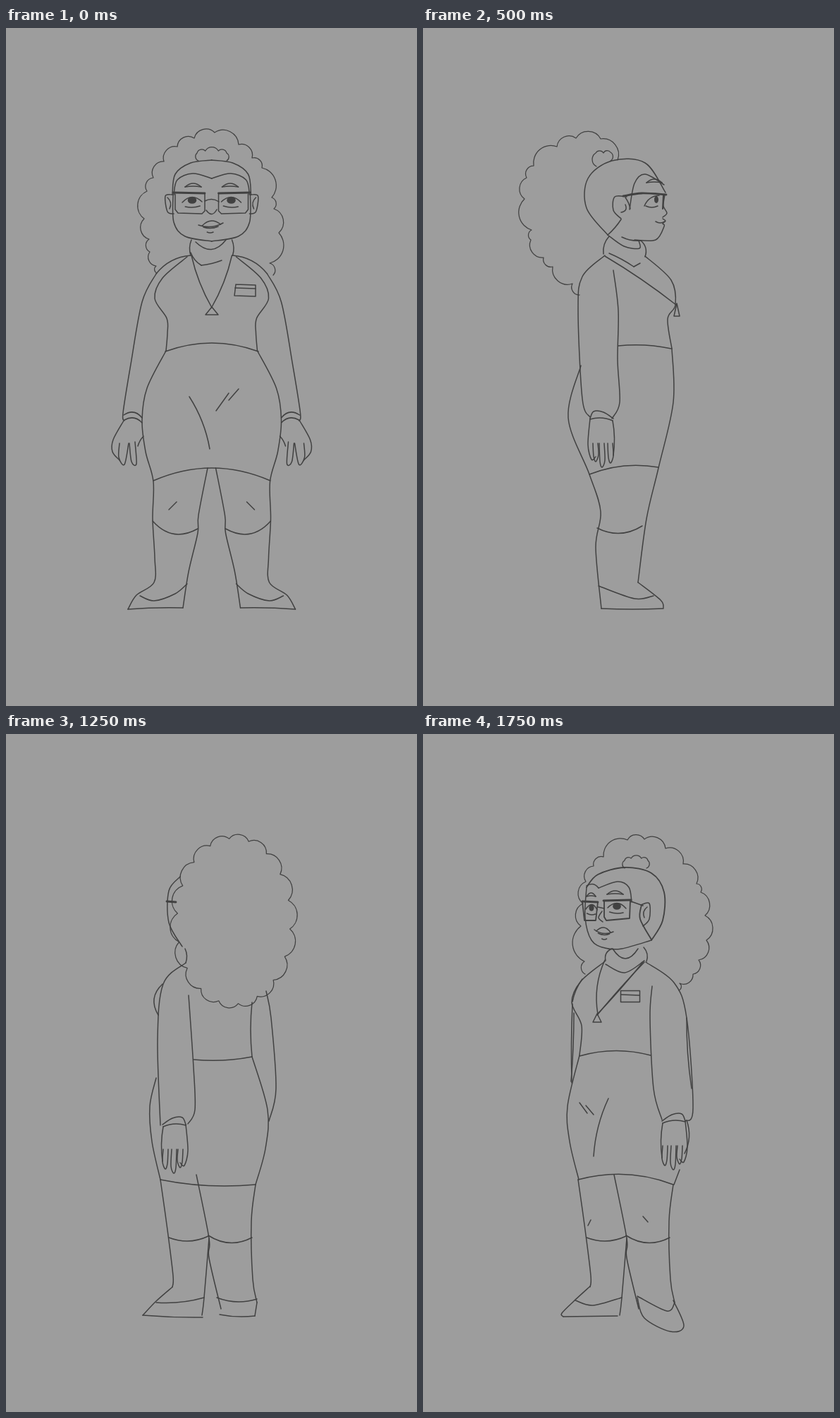
An HTML page with a canvas that plays this animation: 583 px wide and 960 px high, repeating every 2000 ms.

```html
<!DOCTYPE html>
<html lang="en">
<head>
<meta charset="utf-8">
<title>Character turnaround</title>
<style>
  html, body { margin: 0; height: 100%; overflow: hidden; background: #9d9d9d; }
  canvas { display: block; }
</style>
</head>
<body>
<canvas id="stage" width="583" height="960"></canvas>
<script>
const ctx = document.getElementById("stage").getContext("2d");

const pairs = n => n.flatMap((x, i) => i % 2 ? [] : [[x, n[i + 1]]]);
const pen = (width = 1.5) => { ctx.lineWidth = width; };
const trace = d => ctx.stroke(new Path2D(d));

// Smooth stroke through all points.
function line(...n) {
  const p = pairs(n);
  let d = `M${p[0]}`;
  for (let i = 1; i < p.length; i++) {
    const a = p[i - 1], b = p[i], before = p[i - 2] || a, after = p[i + 1] || b;
    const c1 = a.map((v, j) => v + (b[j] - before[j]) / 6);
    const c2 = b.map((v, j) => v - (after[j] - a[j]) / 6);
    d += `C${c1} ${c2} ${b}`;
  }
  trace(d);
}

const poly = (...n) => trace("M" + pairs(n).join("L"));

// Single curve; a positive sag bends down when drawn left to right.
function bow(x1, y1, x2, y2, sag = 0) {
  const k = 2 * sag / Math.hypot(x2 - x1, y2 - y1);
  const cx = (x1 + x2) / 2 - (y2 - y1) * k, cy = (y1 + y2) / 2 + (x2 - x1) * k;
  trace(`M${x1} ${y1}Q${cx} ${cy} ${x2} ${y2}`);
}

// Scalloped outline, one round curl per pair of points.
function curls(...n) {
  const p = pairs(n);
  pen(1.25);
  trace(p.slice(1).reduce((d, end, i) => {
    const r = 0.58 * Math.hypot(end[0] - p[i][0], end[1] - p[i][1]);
    return `${d}A${r} ${r} 0 0 1 ${end}`;
  }, `M${p[0]}`));
  pen();
}

function flipped(axis, dy, draw) {
  ctx.save();
  ctx.transform(-1, 0, 0, 1, axis, dy);
  draw();
  ctx.restore();
}

function both(draw) {
  draw();
  flipped(583.5, 0, draw);
}

function dot(x, y, rx, ry) {
  ctx.beginPath();
  ctx.ellipse(x, y, rx, ry, 0, 0, 7);
  ctx.fill();
}

function bun(x, y, w) {
  curls(x + 2, y, x, y - 11, x + w * .28, y - 14, x + w * .72, y - 14, x + w, y - 11, x + w, y);
}

function eye(x, y, w) {
  bow(x - w, y + 3, x + w, y + 2, -7);
  dot(x, y, w * .45, 4.8);
  bow(x - w * .7, y + 9, x + w * .8, y + 8, 1.5);
}

function brow(x, y, w) {
  bow(x, y, x + w, y, -5);
  bow(x, y, x + w, y, -1);
}

function mouth(x, y, w) {
  bow(x, y, x + w, y - 3, 4);
  bow(x + w * .15, y + 1, x + w * .9, y - 1, -6);
  bow(x + w * .2, y + 3, x + w * .8, y + 2, 2);
  bow(x + w * .35, y + 10, x + w * .6, y + 10, 1);
}

function tassel(x, y, w, h) {
  poly(x, y, x - w, y + h, x + w, y + h, x, y);
}

function hand(x, y) {
  ctx.save();
  ctx.translate(x, y);
  line(0, 8, 5, -2, 19, -1, 33, 8);
  bow(0, 9, 32, 11, -3);
  line(0, 8, -3, 45, 2, 66, 8, 62);
  for (const [left, tip] of [[4, 69], [13, 77], [25, 71]])
    line(left, 43, left + 1, tip - 8, left + 4, tip, left + 8, tip - 10, left + 7, 43);
  bow(33, 60, 32, 11, 2);
  ctx.restore();
}

function curlyHead(...rest) {
  curls(214, 347, 213, 337, 204, 317, 203, 299, 196, 270, 200, 231, 209, 212,
    224, 189, 243, 168, 267, 156, 296, 148, 330, 165, 349, 184, 363, 198,
    377, 240, 380, 256, 387, 290, 374, 333, 379, 350, ...rest);
}

// Arms, hips and legs shared by the front and back views.
function upright(hem) {
  both(() => {
    line(213, 348, 193, 388, 177, 476, 166, 545, 168, 556);
    bow(167, 548, 193, 552, -6);
    bow(168, 555, 193, 559, -5);
    line(167, 556, 152, 583, 151, 600, 161, 612);
    line(161, 588, 160, 608, 168, 618, 174, 588);
    line(175, 588, 178, 614, 185, 617, 183, 586);
    bow(187, 592, 195, 578, -1);
    line(227, 457, 200, 510, 193, 555, 198, 600, 209, 642,
      208, 695, 211, 750, 210, 785, 185, 803, 173, 823);
    line(286, hem, 273, 690, 272, 715, 259, 770, 251, 821);
    bow(173, 823, 251, 821, -1);
    bow(208, 698, 272, 709, 13);
  });
}

function front() {
  curlyHead();
  bun(271, 188, 42);
  both(() => {
    line(236, 236, 240, 207, 262, 191, 292, 187);
    line(238, 236, 243, 215, 265, 206, 292, 213);
    line(237, 236, 238, 275, 254, 295, 292, 302);
    line(236, 236, 226, 238, 229, 260, 238, 263);
    bow(229, 240, 232, 256, -3);
    poly(240, 235, 240, 257, 244, 262, 278, 263, 282, 259, 282, 235);
    pen(2.8);
    bow(237, 233, 282, 234);
    pen();
    eye(264, 244, 14);
    brow(254, 225, 23);
    bow(263, 300, 262, 322, 2);
    bow(263, 322, 292, 396, 3);
    bow(262, 322, 213, 348, 6);
    line(257, 324, 222, 354, 211, 383, 228, 411, 229, 432, 227, 457);
    bow(231, 682, 242, 671);
    line(190, 804, 210, 811, 240, 801, 257, 787);
  });
  bow(282, 245, 302, 246, -3);
  bow(284, 258, 299, 257, 6);
  mouth(273, 279, 35);
  bow(269, 303, 312, 300, 12);
  bow(262, 318, 277, 336, 2);
  bow(277, 336, 306, 329, 1);
  tassel(292, 395, 9, 11);
  poly(326, 363, 354, 364, 354, 380, 324, 379, 326, 363);
  bow(325, 368, 354, 369);
  bow(226, 458, 358, 458, -12);
  bow(209, 641, 375, 641, -18);
  bow(260, 522, 289, 596, -4);
  bow(298, 542, 316, 517);
  bow(316, 527, 330, 511);
  upright(623);
}

function back() {
  curlyHead(363, 365, 328, 381, 250, 375, 235, 365, 213, 349);
  both(() => {
    line(224, 364, 229, 420, 227, 457);
    line(190, 803, 222, 802, 256, 794);
    bow(160, 582, 184, 586, -2);
    bow(178, 571, 192, 591, 2);
    bow(190, 582, 198, 599);
  });
  bow(226, 457, 357, 457, 6);
  bow(204, 626, 379, 628, 5);
  upright(632);
}

function quarterLegs() {
  line(221, 636, 227, 688, 225, 770, 219, 803);
  line(305, 622, 287, 712, 287, 740, 270, 812);
  line(356, 629, 346, 700, 338, 765, 339, 781);
  line(287, 712, 294, 796, 297, 821);
  bow(226, 711, 288, 708, 9);
  bow(288, 709, 344, 711, 6);
}

function quarter() {
  curls(213, 361, 212, 351, 193, 338, 185, 318, 174, 290, 176, 255, 182, 222,
    188, 210, 207, 182, 232, 160, 262, 147, 286, 148, 320, 172, 334, 185,
    345, 207, 349, 238, 352, 270, 347, 320, 346, 338);
  bun(257, 188, 33);
  pen(1.8);
  line(252, 290, 236, 262, 234, 222, 252, 195, 290, 187, 328, 197, 344, 215);
  line(266, 240, 268, 260, 252, 289);
  poly(282, 234, 283, 259, 316, 262, 319, 257, 319, 234);
  poly(328, 236, 331, 262, 347, 262, 350, 235);
  bow(264, 241, 281, 235);
  pen(2.8);
  bow(281, 233, 320, 234);
  bow(328, 236, 350, 235);
  pen();
  line(280, 236, 284, 215, 300, 207, 327, 216);
  bow(327, 216, 344, 213, -4);
  line(344, 215, 346, 258, 337, 290, 318, 301, 294, 302, 252, 290);
  line(267, 240, 255, 238, 255, 260, 264, 270);
  bow(258, 243, 262, 258, -3);
  bow(319, 245, 328, 243);
  eye(301, 242, 13);
  eye(337, 244, 8);
  brow(292, 225, 23);
  brow(331, 228, 13);
  line(322, 249, 327, 258, 321, 264);
  mouth(306, 278, 27);

  bow(263, 300, 259, 320, 3);
  bow(271, 302, 307, 302, 14);
  bow(308, 302, 317, 319, -4);
  line(262, 319, 290, 336, 317, 324);
  bow(262, 321, 329, 396, -1);
  bow(264, 321, 328, 394, 1);
  bow(318, 318, 328, 395, -6);
  tassel(329, 394, 6, 12);
  line(318, 320, 352, 348, 365, 378, 351, 411, 354, 453);
  bow(350, 345, 364, 377, -2);
  bow(364, 380, 365, 492, -1);
  bow(362, 393, 366, 490, 1);

  line(260, 321, 220, 350, 202, 400, 193, 528, 204, 546);
  bow(202, 400, 195, 500, -2);
  line(251, 355, 254, 400, 249, 500, 237, 544);
  hand(204, 538);
  bow(202, 545, 205, 592, 5);

  bow(253, 453, 354, 454, -7);
  line(354, 453, 371, 525, 368, 575, 355, 629);
  bow(212, 615, 220, 636);
  bow(221, 636, 356, 629, -11);
  bow(313, 514, 334, 596, -4);
  bow(334, 537, 345, 524);
  bow(343, 535, 354, 520);
  quarterLegs();
  bow(257, 689, 264, 681);
  bow(338, 686, 342, 694);
  line(221, 800, 206, 836, 225, 844, 262, 825, 272, 796);
  line(219, 803, 230, 815, 272, 794);
  line(339, 780, 362, 801, 379, 818, 377, 823);
  bow(377, 823, 300, 822);
  line(294, 796, 335, 807, 360, 800);
}

function quarterRight() {
  quarter();
  pen(1.9);
  poly(352, 366, 363, 366, 364, 380, 352, 380, 352, 366);
  bow(352, 372, 363, 373);
}

function quarterLeft() {
  flipped(576, 2, quarter);
  ctx.strokeRect(280.5, 363.5, 27, 16);
  bow(281, 369, 307, 370);
}

function side() {
  curls(222, 378, 212, 362, 184, 338, 171, 325, 153, 300, 154, 286, 144, 242,
    147, 212, 157, 195, 190, 168, 217, 156, 252, 157, 276, 187);
  curls(246, 196, 245, 177, 256, 177, 266, 176, 266, 188);
  line(262, 293, 232, 255, 234, 213, 268, 188, 315, 191, 344, 233);
  line(293, 257, 300, 220, 315, 207, 342, 222);
  bow(262, 293, 281, 271, 1);
  line(289, 239, 272, 239, 270, 258, 281, 270);
  bow(287, 250, 281, 261, -4);
  bow(287, 240, 294, 256, -1);
  pen(2.8);
  line(284, 238, 310, 234, 345, 236);
  pen(2);
  bow(341, 237, 340, 256);
  pen();
  line(343, 236, 341, 252, 346, 262, 340, 268);
  line(340, 270, 344, 273, 340, 277, 342, 281, 330, 300, 300, 300);
  bow(330, 274, 343, 274, 2);
  bow(314, 252, 335, 237, -4);
  dot(331, 243, 3, 5);
  bow(316, 252, 333, 252, 2);
  brow(317, 219, 22);

  bow(264, 295, 256, 320, 3);
  line(262, 293, 285, 309, 307, 312, 306, 301);
  bow(282, 296, 310, 301, 2);
  bow(309, 301, 315, 324, -4);
  bow(264, 319, 299, 338, -1);
  bow(299, 338, 308, 333);
  line(315, 323, 352, 357, 358, 392, 347, 412, 353, 454);
  bow(258, 323, 359, 392, -2);
  tassel(360, 390, 4, 18);

  line(258, 322, 226, 352, 220, 400, 226, 525, 237, 551);
  line(270, 343, 277, 400, 276, 470, 279, 530, 268, 553);
  hand(237, 545);
  line(224, 478, 206, 552, 236, 632, 252, 685, 245, 735, 253, 822);
  line(353, 454, 355, 530, 334, 623, 317, 695, 305, 785);
  line(305, 785, 337, 810, 341, 821);
  bow(253, 822, 341, 822, 1);
  bow(277, 450, 352, 454, -3);
  bow(236, 632, 334, 622, -7);
  bow(247, 708, 311, 705, 9);
  line(249, 790, 300, 808, 327, 804);
}

function rear() {
  const outline = [];
  for (let i = 0; i <= 18; i++) {
    const a = i * Math.PI / 9 + 2;
    outline.push(252 + 80 * Math.cos(a), 263 + 117 * Math.sin(a));
  }
  curls(...outline);
  line(328, 200, 344, 220, 344, 265, 325, 299);
  pen(2.8);
  bow(334, 236, 347, 235);
  pen();
  bow(321, 302, 320, 322, 2);
  line(320, 322, 352, 352, 360, 430, 356, 552);
  line(316, 368, 309, 470, 307, 530, 317, 550);
  hand(320, 543);
  bow(353, 352, 359, 396, -9);
  bow(226, 378, 226, 455, -2);
  line(206, 362, 199, 400, 192, 500, 202, 546);
  bow(226, 455, 309, 459, 3);
  line(226, 455, 204, 530, 207, 585, 221, 636);
  line(362, 485, 371, 525, 368, 575, 356, 629);
  bow(221, 636, 356, 629, 5);
  quarterLegs();
  bow(219, 803, 222, 822);
  bow(222, 822, 272, 820, 2);
  bow(219, 798, 276, 796, 5);
  line(339, 781, 362, 801, 381, 821);
  bow(296, 824, 381, 821, 1);
  bow(294, 796, 362, 803, 3);
}

const poses = [
  front,
  quarterRight,
  side,
  rear,
  back,
  () => flipped(575, 2, rear),
  () => flipped(569, 1, side),
  quarterLeft
];

const began = performance.now();
function tick() {
  const time = (performance.now() - began) % 2000;
  ctx.fillStyle = "#9d9d9d";
  ctx.fillRect(0, 0, 583, 960);
  ctx.fillStyle = ctx.strokeStyle = "#414141";
  ctx.lineCap = ctx.lineJoin = "round";
  pen();
  poses[Math.floor(time / 250)]();
  requestAnimationFrame(tick);
}
tick();
</script>
</body>
</html>
```
